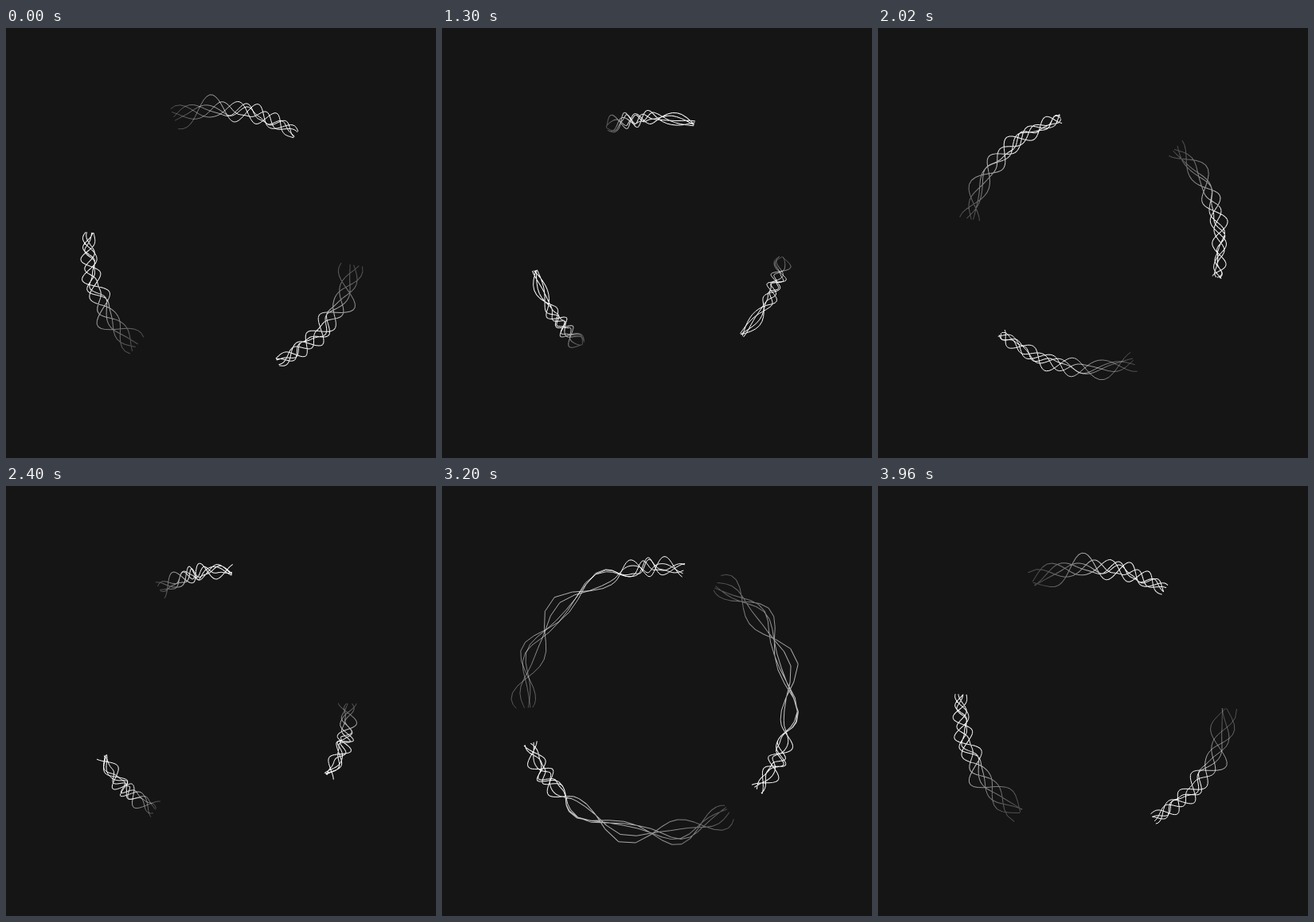
Write an HTML page with a canvas that moves like this. It is 540x540 px and loops after 3980 ms.

```html
<!DOCTYPE html>
<html>
<head>
<meta charset="utf-8">
<style>
html, body { margin: 0; height: 100%; overflow: hidden; background: #151515; }
canvas { display: block; }
</style>
</head>
<body>
<canvas id="stage" width="540" height="540"></canvas>
<script>
const ctx = document.getElementById('stage').getContext('2d');
const LOOP = 3980, TURN = 480, TRAIL = 600, STEP = 10, TAU = Math.PI * 2;

// Head angle in degrees (clockwise from the top) at times in ms
const keys = [
  [0, 34.6], [580, 72], [700, 96.3], [1200, 119], [1300, 137.4], [1420, 161],
  [1560, 187], [2020, 225.5], [2180, 230.5], [2600, 267], [2700, 298],
  [2780, 341], [3200, 371.5], [3380, 459.4], [3540, 482], [3960, 512.9]
];

// Phase, cycles per loop and swing of each strand
const strands = [
  { phase: 0, cycles: 12, swing: 13 },
  { phase: 0.5, cycles: 12, swing: 11 },
  { phase: 0.25, cycles: 13, swing: 7 },
  { phase: 0.7, cycles: 11, swing: 8 },
  { phase: 0.85, cycles: 13, swing: 6 }
];

function key(i) {
  const n = keys.length, lap = Math.floor(i / n), [t, a] = keys[i - lap * n];
  return [t + lap * LOOP, a + lap * TURN];
}

function secant(i) {
  const [t0, a0] = key(i), [t1, a1] = key(i + 1);
  return (a1 - a0) / (t1 - t0);
}

// Harmonic mean keeps the rotation from ever turning back
function slope(i) {
  const a = secant(i - 1), b = secant(i);
  return 2 * a * b / (a + b);
}

function degreesAt(t) {
  const lap = Math.floor(t / LOOP), local = t - lap * LOOP;
  let i = keys.length - 1;
  while (keys[i][0] > local) i--;
  const [t0, a0] = key(i), [t1, a1] = key(i + 1);
  const h = t1 - t0, u = (local - t0) / h, v = 1 - u;
  return lap * TURN + a0 * v * v * (1 + 2 * u) + a1 * u * u * (3 - 2 * u)
    + h * u * v * (slope(i) * v - slope(i + 1) * u);
}

// The strands weave with both time and distance travelled
function radiusAt(strand, i, t, degrees, age) {
  const swell = Math.cos(TAU * (t - 3200) / LOOP);
  const turns = strand.cycles * (t - 3490) / LOOP + 8 * (degrees - 475) / TURN;
  const wave = Math.cos(TAU * (turns - strand.phase));
  const ripple = Math.sin(TAU * (22 + 3 * i) * t / LOOP + 2 * i);
  const offset = strand.swing * wave + 2 * wave * wave + 2 * ripple;
  return 162 + 5.5 * swell + (0.7 + 0.45 * age) * (0.95 + 0.15 * swell) * offset;
}

function draw(now) {
  ctx.setTransform(1, 0, 0, 1, 0, 0);
  ctx.fillStyle = '#151515';
  ctx.fillRect(0, 0, 540, 540);
  ctx.lineWidth = 1;

  const path = [];
  for (let back = 0; back <= TRAIL; back += STEP) {
    const t = now - back, age = back / TRAIL;
    const degrees = degreesAt(t), angle = degrees * Math.PI / 180;
    path.push({
      alpha: Math.min(1, 0.25 + 1.9 * (1 - age)),
      points: strands.map((s, i) => {
        const r = radiusAt(s, i, t, degrees, age);
        return [r * Math.sin(angle), -r * Math.cos(angle)];
      })
    });
  }

  for (let arm = 0; arm < 3; arm++) {
    ctx.setTransform(1, 0, 0, 1, 270, 270);
    ctx.rotate(arm * TAU / 3);
    for (let j = path.length - 1; j > 0; j--) {
      ctx.strokeStyle = `rgba(255,255,255,${path[j].alpha})`;
      ctx.beginPath();
      path[j].points.forEach((p, i) => {
        ctx.moveTo(...p);
        ctx.lineTo(...path[j - 1].points[i]);
      });
      ctx.stroke();
    }
  }
}

const start = performance.now();
function tick() {
  const t = (performance.now() - start) % LOOP;
  draw(Math.floor(t / 20) * 20);
  requestAnimationFrame(tick);
}
tick();
</script>
</body>
</html>
```
